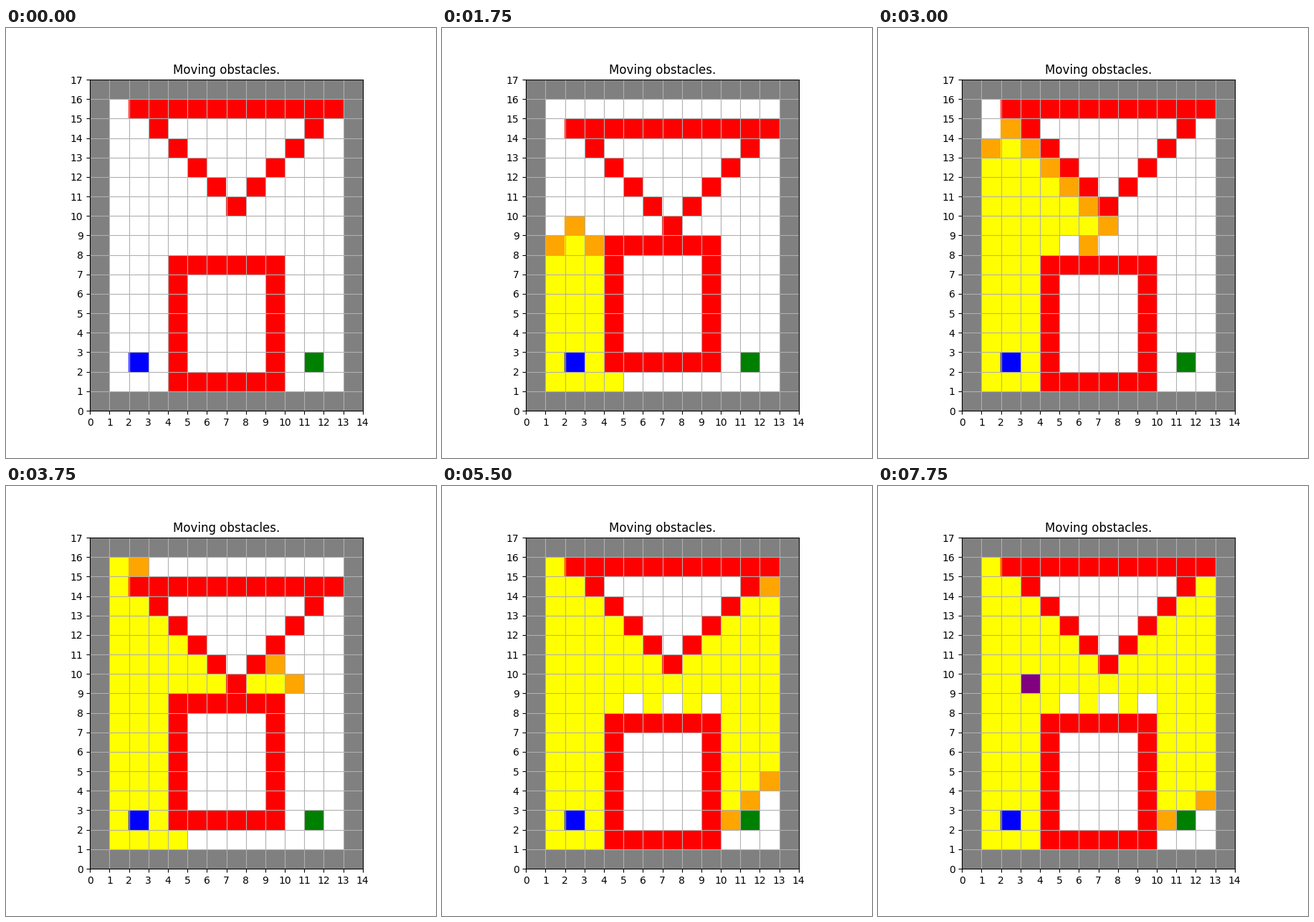
Animation of 600 by 600 pixels, one loop 8000 ms. Source, as a matplotlib script:

```python
import matplotlib.pyplot as plt
import numpy as np
from matplotlib.animation import FuncAnimation
from matplotlib.colors import to_rgb

W, H = 14, 17
START, GOAL = (2, 2), (11, 2)
STEPS, INTERVAL = 32, 250
MOVES = [(0, 1), (1, 0), (0, -1), (-1, 0)]  # up, right, down, left


def make_obstacles(shift):
    """Triangle lowered and box raised by the given shift."""
    cells = {(x, 15 - shift) for x in range(2, 13)}
    cells |= {(x, 10 + abs(x - 7) - shift) for x in range(3, 12)}
    cells |= {(x, y + shift) for x in range(4, 10) for y in range(1, 8)
              if x in (4, 9) or y in (1, 7)}
    return cells


OBSTACLES = [make_obstacles(0), make_obstacles(1)]


def obstacles_at(t):
    return OBSTACLES[t % 2]


def is_wall(x, y):
    return x in (0, W - 1) or y in (0, H - 1)


def can_move(cell, new, t):
    """Moving from cell at time t to new at t + 1, without swapping places."""
    now, later = obstacles_at(t), obstacles_at(t + 1)
    if is_wall(*new) or new in later:
        return False
    return not (new in now and cell in later)


def search():
    """Breadth-first search; returns depths, the open queue and the path."""
    depth, parent, queue = {START: 0}, {}, [START]
    while queue and GOAL not in depth:
        cell = queue.pop(0)
        t = depth[cell]
        for dx, dy in MOVES:
            new = (cell[0] + dx, cell[1] + dy)
            if new in depth or not can_move(cell, new, t):
                continue
            depth[new], parent[new] = t + 1, cell
            queue.append(new)
            if new == GOAL:
                break
    path = [GOAL]
    while path[-1] != START:
        path.append(parent[path[-1]])
    return depth, queue, path[::-1]


depth, open_cells, path = search()
search_steps = depth[GOAL]

walls = [(x, y) for x in range(W) for y in range(H) if is_wall(x, y)]


def make_grid(i):
    grid = np.ones((H, W, 3))

    def paint(cells, color):
        for x, y in cells:
            grid[y, x] = to_rgb(color)

    if i < search_steps:
        t = i
        visited = [c for c in depth if depth[c] < t]
        frontier = [c for c in depth if depth[c] == t]
        robot = []
    else:
        t = i - search_steps
        visited, frontier = depth, open_cells
        robot = [path[t]]

    paint(walls, "gray")
    paint(visited, "yellow")
    paint(frontier, "orange")
    paint(obstacles_at(t), "red")
    paint([START], "blue")
    paint([GOAL], "green")
    paint(robot, "purple")
    return grid


fig, ax = plt.subplots(figsize=(6, 6), dpi=100)
image = ax.imshow(make_grid(0), origin="lower", extent=(0, W, 0, H))
ax.set_title("Moving obstacles.")
ax.set_xticks(range(W + 1))
ax.set_yticks(range(H + 1))
ax.grid(True)


def update(i):
    image.set_data(make_grid(i))
    return [image]


anim = FuncAnimation(fig, update, frames=STEPS, interval=INTERVAL,
                     repeat=True, repeat_delay=0)
plt.show()
```
